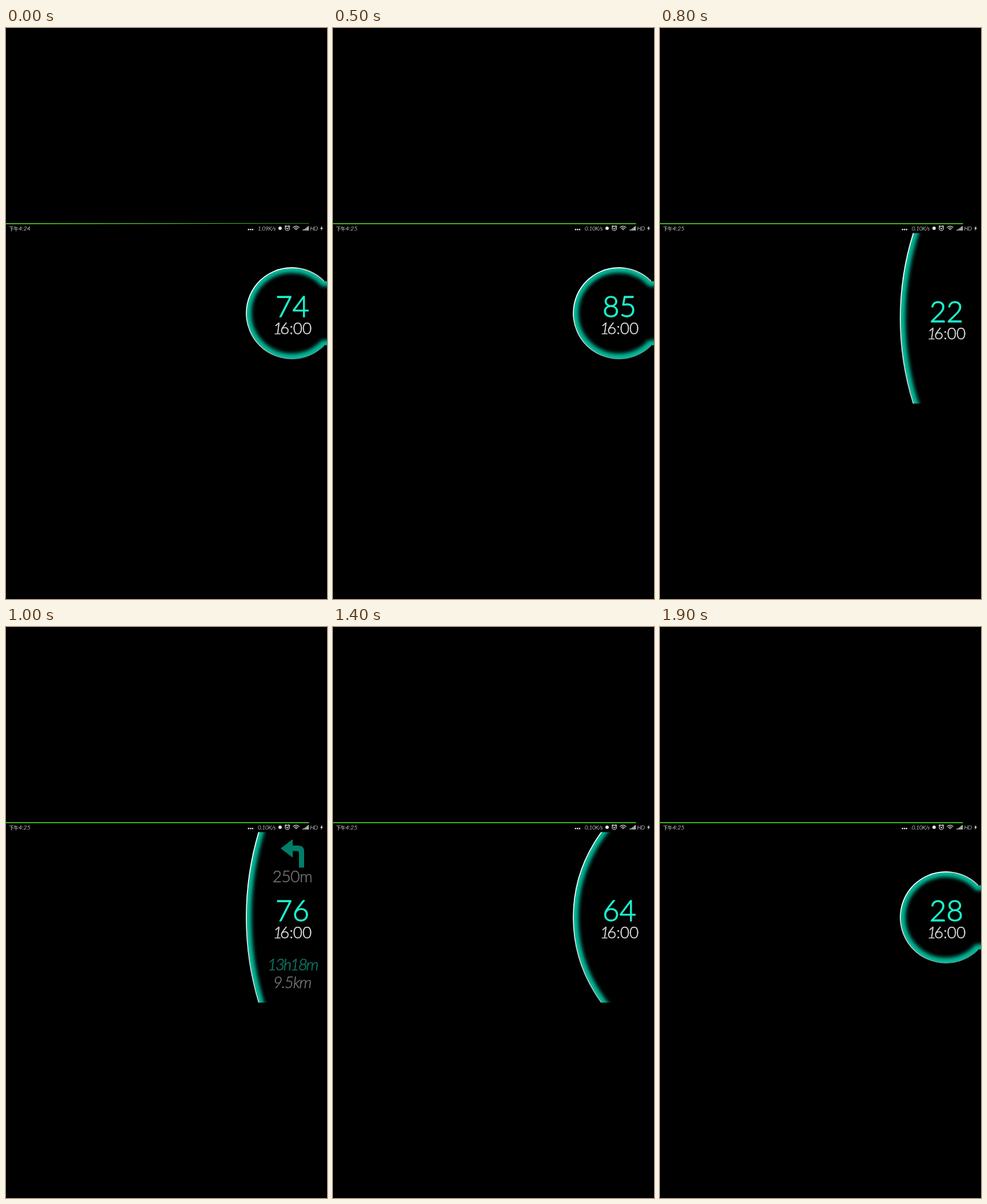
An HTML page for the animation above (2000 ms loop, 561 by 998 pixels).

```html
<!DOCTYPE html>
<html lang="zh">
<head>
<meta charset="utf-8">
<title>Speed dial</title>
<style>
  html, body { margin: 0; width: 100%; height: 100%; overflow: hidden; background: #000; }
  svg { display: block; width: 561px; height: 998px; }
  text { font-family: Lato, "Noto Sans CJK SC", "Noto Sans CJK", sans-serif; font-weight: 300; }
  .status text { font-size: 10px; font-style: italic; fill: #d2d2d2; stroke: #d2d2d2; stroke-width: .2px; }
  .icon { fill: none; stroke: #e2e2e2; stroke-width: 1.2; stroke-linecap: round; }
  .solid { fill: #e2e2e2; }
  .panel { text-anchor: middle; font-size: 28px; fill: #dedede; }
  .panel text { stroke: #dedede; stroke-width: .6px; stroke-linejoin: round; }
  .panel .teal { fill: #1cf0cb; stroke: #1cf0cb; }
  .panel #speed { font-size: 51px; stroke-width: 1.3px; }
  .slant { font-style: italic; }
</style>
</head>
<body>
<svg viewBox="0 0 561 998">
  <defs>
    <path id="shape"/>
    <clipPath id="inside"><use href="#shape"/></clipPath>
    <clipPath id="view"><rect x="410" y="358.5" width="151" height="298"/></clipPath>
    <clipPath id="arc"><rect x="410" y="358.5" width="146" height="298"/></clipPath>
    <filter id="soft" filterUnits="userSpaceOnUse" x="380" y="320" width="220" height="380">
      <feGaussianBlur stdDeviation="3"/>
    </filter>
    <linearGradient id="rim" x1="0" y1="0" x2="1" y2="1">
      <stop offset=".2" stop-color="#fff"/>
      <stop offset=".3" stop-color="#e2dcde"/>
      <stop offset=".52" stop-color="#a9bbb6"/>
      <stop offset=".75" stop-color="#3fa28f"/>
    </linearGradient>
  </defs>
  <rect width="561" height="998"/>

  <path id="charge" fill="#41b41f"/>
  <g class="status">
    <text x="5.5" y="353.5" style="font-size:8px;font-style:normal">下午</text>
    <text id="clock" x="22" y="354" style="font-size:10.5px"></text>
    <g class="solid">
      <rect x="422.7" y="351" width="2.4" height="2.4"/>
      <rect x="426.2" y="351" width="2.4" height="2.4"/>
      <rect x="429.7" y="351" width="2.4" height="2.4"/>
    </g>
    <text id="rate" x="440" y="353.7" letter-spacing="-.3"></text>
    <circle class="solid" cx="479" cy="350" r="3"/>
    <g class="icon">
      <circle cx="491.7" cy="350.2" r="3.8"/>
      <path d="M487.6 347l1.7-1.5M495.8 347l-1.7-1.5M490 349.6l1.7 1.5 1.8-1.5"/>
      <path d="M501.8 348.6q5.2-4.4 10.4 0M503.8 350.6q3.2-2.6 6.4 0M505.8 352.4q1.2-.9 2.4 0"/>
    </g>
    <path d="M519.2 354v-1.5M521.5 354v-2.8M523.8 354v-4.3M526.1 354v-6M528.2 354v-7.8" fill="none" stroke="#dcdcdc" stroke-width="1.6"/>
    <text x="531.5" y="353.7" letter-spacing="-.6">HD</text>
    <path class="solid" d="M552.8 345.5L549 350.8H551.3L550.2 354.8L554 349.3H551.7Z"/>
  </g>

  <g clip-path="url(#view)">
    <g clip-path="url(#inside)">
      <use href="#shape" fill="none" stroke="#05b797" stroke-width="18" filter="url(#soft)"/>
    </g>
  </g>
  <g clip-path="url(#arc)">
    <use href="#shape" fill="none" stroke="url(#rim)" stroke-width="1.8"/>
  </g>

  <g class="panel">
    <g id="readout">
      <text id="speed" class="teal" x="500.5" y="513.5"></text>
      <text x="500.5" y="544.3"><tspan class="slant" letter-spacing="-4">1</tspan>6:00</text>
    </g>
    <g id="route">
      <path fill="#02fcd1" d="M480 387L501 371V382H511Q521 382 521 392V420.5H512V395Q512 391.5 508.5 391.5H501V403Z"/>
      <text x="500.5" y="446" letter-spacing="-.4">250m</text>
      <text class="teal slant" x="500.5" y="600" letter-spacing="-2.4">13h18m</text>
      <text class="slant" x="500" y="631" letter-spacing="-1.4">9.5km</text>
    </g>
  </g>
</svg>
<script>
  const STEP = 100, LEFT = 420, JOINT = 556;
  const SPEEDS = [74, 31, 58, 66, 47, 85, 23, 61, 22, 39, 76, 45, 52, 18, 64, 37, 73, 56, 41, 28];
  // Dial radius at given steps; steps between are interpolated.
  const RADII = [[0, 79.5], [5, 79.5], [6, 84.6], [7, 250], [8, 497], [9, 519], [13, 519], [14, 250], [15, 84.6], [16, 79.5], [19, 79.5]];
  const el = id => document.getElementById(id);

  function radiusAt(step) {
    const next = Math.max(1, RADII.findIndex(([s]) => s >= step));
    const [s0, r0] = RADII[next - 1], [s1, r1] = RADII[next];
    return r0 + (r1 - r0) * (step - s0) / (s1 - s0);
  }

  // A circle pinned at its left side, joined to a band leaving the screen at the right.
  function dialPath(r, cy) {
    const cx = LEFT + r, half = Math.sqrt(r * r - (JOINT - cx) ** 2);
    return `M590 ${cy - half}H${JOINT}A${r} ${r} 0 ${cx < JOINT ? 1 : 0} 0 ${JOINT} ${cy + half}H590Z`;
  }

  function draw(step) {
    const lift = step < 6 ? -9 : 0;
    el("shape").setAttribute("d", dialPath(radiusAt(step), 507.5 + lift));
    el("readout").setAttribute("transform", `translate(0 ${lift})`);
    el("speed").textContent = SPEEDS[step];
    el("clock").textContent = step < 1 ? "4:24" : "4:25";
    el("rate").textContent = step < 5 ? "1.09K/s" : "0.10K/s";
    // The charge line tapers to the right until the clock advances.
    el("charge").setAttribute("d", `M0 341H529.5V${step < 1 ? 341.8 : 343}H0Z`.replace("H0Z", "L0 343Z"));
    el("route").setAttribute("opacity", step < 13 ? Math.min(1, Math.max(0, (step - 9) / 2)) : 0);
  }

  let shown = -1;
  function tick() {
    const step = Math.floor(performance.now() / STEP) % SPEEDS.length;
    if (step !== shown) draw(shown = step);
    requestAnimationFrame(tick);
  }
  tick();
</script>
</body>
</html>
```
